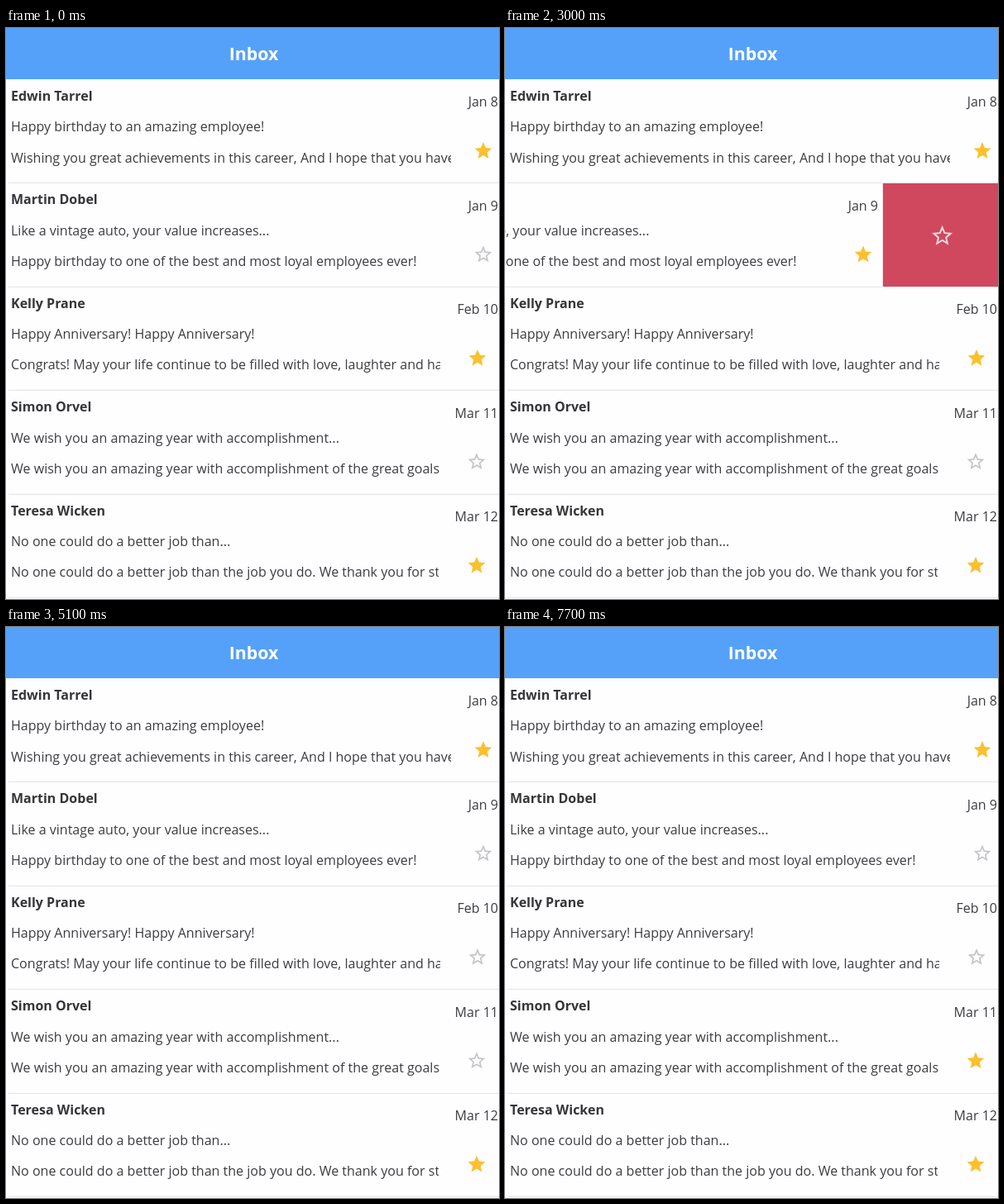
Write an HTML page with a canvas that moves like this. It is 596x691 px and loops after 7.9 s.

```html
<!DOCTYPE html>
<html lang="en">
<head>
<meta charset="utf-8">
<title>Inbox</title>
<style>
  html, body { margin: 0; width: 100%; height: 100%; overflow: hidden; background: #fefdff; }
  canvas { display: block; }
</style>
</head>
<body>
<canvas id="stage" width="596" height="691"></canvas>
<script>
const ctx = document.getElementById('stage').getContext('2d');
const W = 596, H = 691, LOOP = 7900, STEP = 100;
const HEADER = 62, ROW_H = 125.4, ROW_W = 600.6, REVEAL = 144;
const FONT = '"Open Sans", "Noto Sans", sans-serif';
const BODY = '16.04px ' + FONT, BOLD = 'bold 16px ' + FONT;
const INK = '#3d3c40', GOLD = '#fbc02d', GREY = '#c4c3c7', RED = '#cf485d';

const SOLID = new Path2D('M12 17.27 18.18 21l-1.64-7.03L22 9.24l-7.19-.61L12 2 9.19 8.63 2 9.24l5.46 4.73L5.82 21z');
const OUTLINE = new Path2D('M22 9.24l-7.19-.62L12 2 9.19 8.63 2 9.24l5.46 4.73L5.82 21 12 17.27 18.18 21l-1.63-7.03L22 9.24z' +
  'M12 15.4l-3.76 2.27 1-4.28-3.32-2.88 4.38-.38L12 6.1l1.71 4.04 4.38.38-3.32 2.88 1 4.28L12 15.4z');

// toggles: times at which the star flips
const mails = [
  { name: 'Edwin Tarrel', date: 'Jan 8', starX: 577, clip: 538, starred: true, toggles: [],
    title: 'Happy birthday to an amazing employee!',
    text: 'Wishing you great achievements in this career, And I hope that you have a' },
  { name: 'Martin Dobel', date: 'Jan 9', starX: 577, clip: 538, starred: false, toggles: [1900, 3800],
    title: 'Like a vintage auto, your value increases...',
    text: 'Happy birthday to one of the best and most loyal employees ever!' },
  { name: 'Kelly Prane', date: 'Feb 10', starX: 570, clip: 525, starred: true, toggles: [5100],
    title: 'Happy Anniversary! Happy Anniversary!',
    text: 'Congrats! May your life continue to be filled with love, laughter and happiness' },
  { name: 'Simon Orvel', date: 'Mar 11', starX: 569, clip: 524, starred: false, toggles: [6500],
    title: 'We wish you an amazing year with accomplishment...',
    text: 'We wish you an amazing year with accomplishment of the great goals' },
  { name: 'Teresa Wicken', date: 'Mar 12', starX: 569, clip: 523, starred: true, toggles: [],
    title: 'No one could do a better job than...',
    text: 'No one could do a better job than the job you do. We thank you for sticking' }
];

const swipes = [
  { row: 1, open: 800, openSteps: 8, close: 1600, closeSteps: 4 },
  { row: 1, open: 3000, openSteps: 1, close: 3500, closeSteps: 4 },
  { row: 2, open: 4300, openSteps: 4, close: 4700, closeSteps: 4 },
  { row: 3, open: 5600, openSteps: 3, close: 6400, closeSteps: 2 }
];

function ease(t, start, steps) {
  const k = Math.floor((t - start) / STEP) + 1;
  const p = Math.min(1, Math.max(0, k / steps));
  return 1 - Math.pow(1 - p, 1.875);
}

function offsetOf(row, t) {
  return swipes.filter(s => s.row === row).reduce((sum, s) =>
    sum + REVEAL * (ease(t, s.open, s.openSteps) - ease(t, s.close, s.closeSteps)), 0);
}

function label(str, x, y, font, color, align = 'left') {
  ctx.font = font;
  ctx.fillStyle = color;
  ctx.textAlign = align;
  ctx.fillText(str, x, y);
}

function star(path, x, y, scale, color) {
  ctx.save();
  ctx.translate(x, y);
  ctx.scale(scale, scale);
  ctx.translate(-12, -11.5);
  ctx.fillStyle = color;
  ctx.fill(path, 'evenodd');
  ctx.restore();
}

function clipTo(x, y, w, h) {
  ctx.beginPath();
  ctx.rect(x, y, w, h);
  ctx.clip();
}

function drawMail(mail, top, t) {
  label(mail.name, 6, top + 26, BOLD, '#363539');
  label(mail.title, 6, top + 63.3, BODY, INK);
  label(mail.date, 595, top + 33.3, BODY, INK, 'right');
  ctx.save();
  clipTo(0, top, mail.clip, ROW_H);
  label(mail.text, 6, top + 100.5, BODY, INK);
  ctx.restore();

  const flips = mail.toggles.filter(time => t >= time).length;
  const on = mail.starred !== (flips % 2 === 1);
  star(on ? SOLID : OUTLINE, mail.starX, top + 86, 1.04, on ? GOLD : GREY);

  ctx.fillStyle = '#e2e1e4';
  ctx.fillRect(3, Math.round(top + ROW_H) - 0.2, ROW_W - 3, 1);
}

function drawPanel(top, shift) {
  const x = ROW_W - shift, y = top + 0.4;
  ctx.save();
  clipTo(x, y, shift, ROW_H);
  ctx.fillStyle = RED;
  ctx.fillRect(x, y, shift, ROW_H);
  star(OUTLINE, x + shift / 2, top + 63.4, 1.26, '#f5d9de');
  ctx.restore();
}

function draw(t) {
  ctx.fillStyle = '#fefdff';
  ctx.fillRect(0, 0, W, H);
  mails.forEach((mail, i) => {
    const top = HEADER + i * ROW_H, shift = offsetOf(i, t);
    ctx.save();
    ctx.translate(-shift, 0);
    drawMail(mail, top, t);
    ctx.restore();
    if (shift > 0.01) drawPanel(top, shift);
  });
  ctx.fillStyle = '#55a1f9';
  ctx.fillRect(0, 0, W, HEADER);
  label('Inbox', 299.5, 39, 'bold 21.3px ' + FONT, '#fff', 'center');
}

const start = performance.now();
function frame() {
  draw((performance.now() - start) % LOOP);
  requestAnimationFrame(frame);
}
frame();
</script>
</body>
</html>
```
